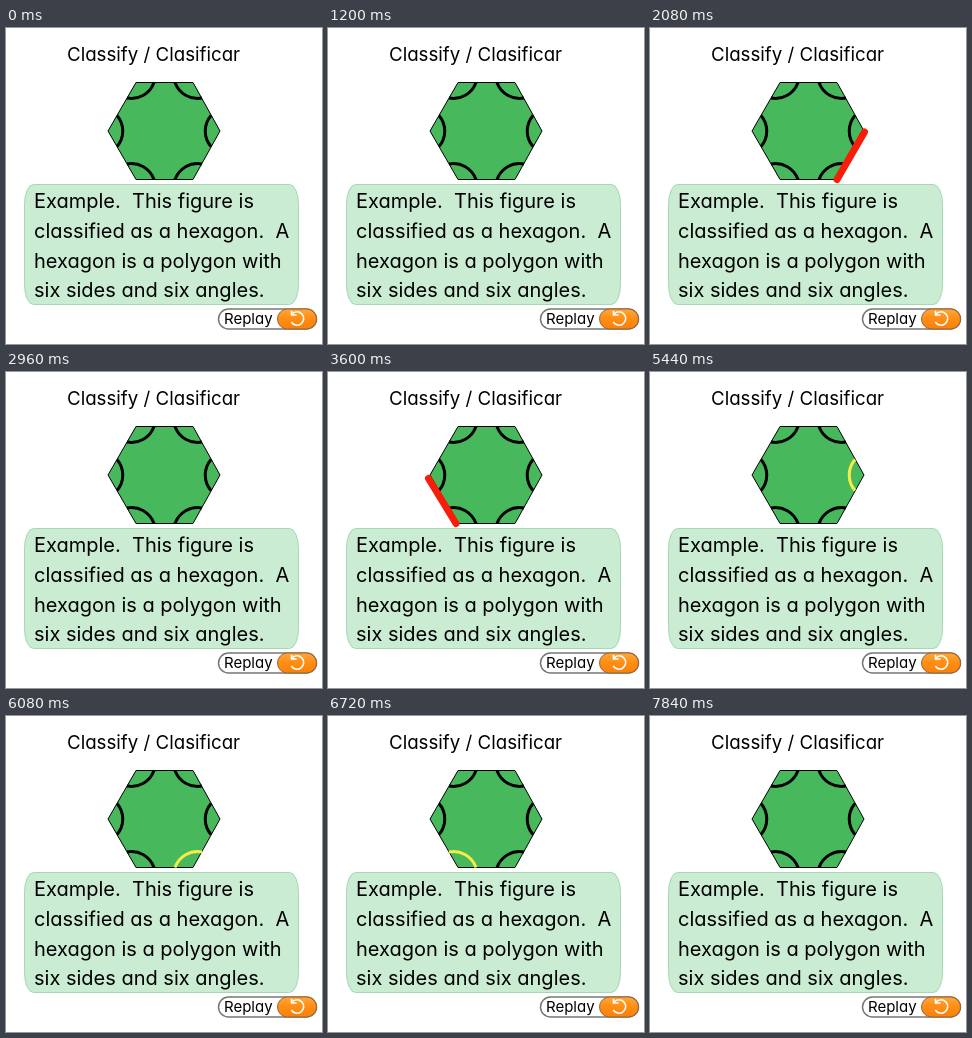
These frames come from a looping animation (316x316 px, 8000 ms). An HTML page:

```html
<!DOCTYPE html>
<html lang="en">
<head>
<meta charset="utf-8">
<title>Classify</title>
<style>
  html, body { margin: 0; width: 100%; height: 100%; overflow: hidden; background: #fff; }
  svg { display: block; width: 100vw; height: 100vh; }
  text { font-family: Inter, Lato, sans-serif; font-feature-settings: "cv11"; white-space: pre; }
</style>
</head>
<body>
<svg viewBox="0 0 316 316">
  <defs>
    <linearGradient id="orange" x2="0" y2="1">
      <stop offset="0" stop-color="#ffa638"/>
      <stop offset=".5" stop-color="#ff8d14"/>
      <stop offset="1" stop-color="#fa800a"/>
    </linearGradient>
  </defs>

  <text x="61" y="33" font-size="18.7">Classify / Clasificar</text>

  <polygon id="hexagon" fill="#48b85c" stroke="#000"/>
  <g id="arcs" fill="none" stroke="#000" stroke-width="3"></g>
  <g id="sides" stroke="#f91c0a" stroke-width="7" stroke-linecap="round"></g>

  <rect x="18.5" y="156.5" width="274" height="120" rx="9" ry="20" fill="#caecd3" stroke="#a5d8b3"/>
  <g font-size="20">
    <text x="28" y="180">Example.  This figure is</text>
    <text x="28" y="209.5">classified as a hexagon.  A</text>
    <text x="28" y="239.5">hexagon is a polygon with</text>
    <text x="28" y="269">six sides and six angles.</text>
  </g>

  <g id="replay">
    <rect x="212.5" y="281" width="98" height="20" rx="10" fill="#fff" stroke="#777" stroke-width="1.5"/>
    <rect x="271.5" y="281" width="39" height="20" rx="10" fill="url(#orange)" stroke="#9a6530"/>
    <text x="218" y="296" font-size="15">Replay</text>
    <path d="M286 286A6.7 6.7 0 1 1 285.3 294M285.5 282.7v4.3h5" fill="none" stroke="#fff" stroke-width="1.6"/>
  </g>
</svg>
<script>
const LOOP = 8000;
const NS = "http://www.w3.org/2000/svg";
const byId = id => document.getElementById(id);

// Clockwise from the top left.
const corners = [[130, 54.5], [187, 54.5], [214, 103], [187, 151.5], [130, 151.5], [102, 103]];

function add(parent, d) {
  const path = document.createElementNS(NS, "path");
  path.setAttribute("d", d);
  return byId(parent).appendChild(path);
}

// A shallow arc joining the two sides that meet at a corner.
function cornerArc([x, y], i) {
  const reach = 18, radius = 24;
  const point = degrees => {
    const a = degrees * Math.PI / 180;
    return `${x + reach * Math.cos(a)} ${y + reach * Math.sin(a)}`;
  };
  return add("arcs", `M${point(i * 60)}A${radius} ${radius} 0 0 1 ${point(i * 60 + 120)}`);
}

byId("hexagon").setAttribute("points", corners.join(" "));
const arcs = corners.map(cornerArc);
const sides = [
  "M130 56.7H186.5",
  "M187 55L214 102",
  "M214.5 104L187 151.5",
  "M187.5 150.2H130",
  "M128 151.5L100.5 106.5",
  "M101.5 99.7L128.5 54"
].map(d => add("sides", d));

// Five arcs follow the six sides; the arcs begin with the top right corner.
const parts = [...sides, ...arcs.slice(1)];

// Three parts blink in turn every two seconds, three flashes each.
const starts = [720, 1440, 2080];
const flashes = [[0, 160, 400], [0, 160, 320], [0, 160, 320]];

function isLit(part, t) {
  const k = part % 3;
  const start = starts[k] + Math.floor(part / 3) * 2000;
  return flashes[k].some(f => t >= start + f && t < start + f + 80);
}

function draw(t) {
  const active = parts.find((_, i) => isLit(i, t));
  for (const side of sides) side.setAttribute("visibility", side === active ? "visible" : "hidden");
  for (const arc of arcs) arc.setAttribute("stroke", arc === active ? "#f6ec48" : "#000");
}

const began = performance.now();
function tick() {
  draw((performance.now() - began) % LOOP);
  requestAnimationFrame(tick);
}
draw(0);
tick();
</script>
</body>
</html>
```
